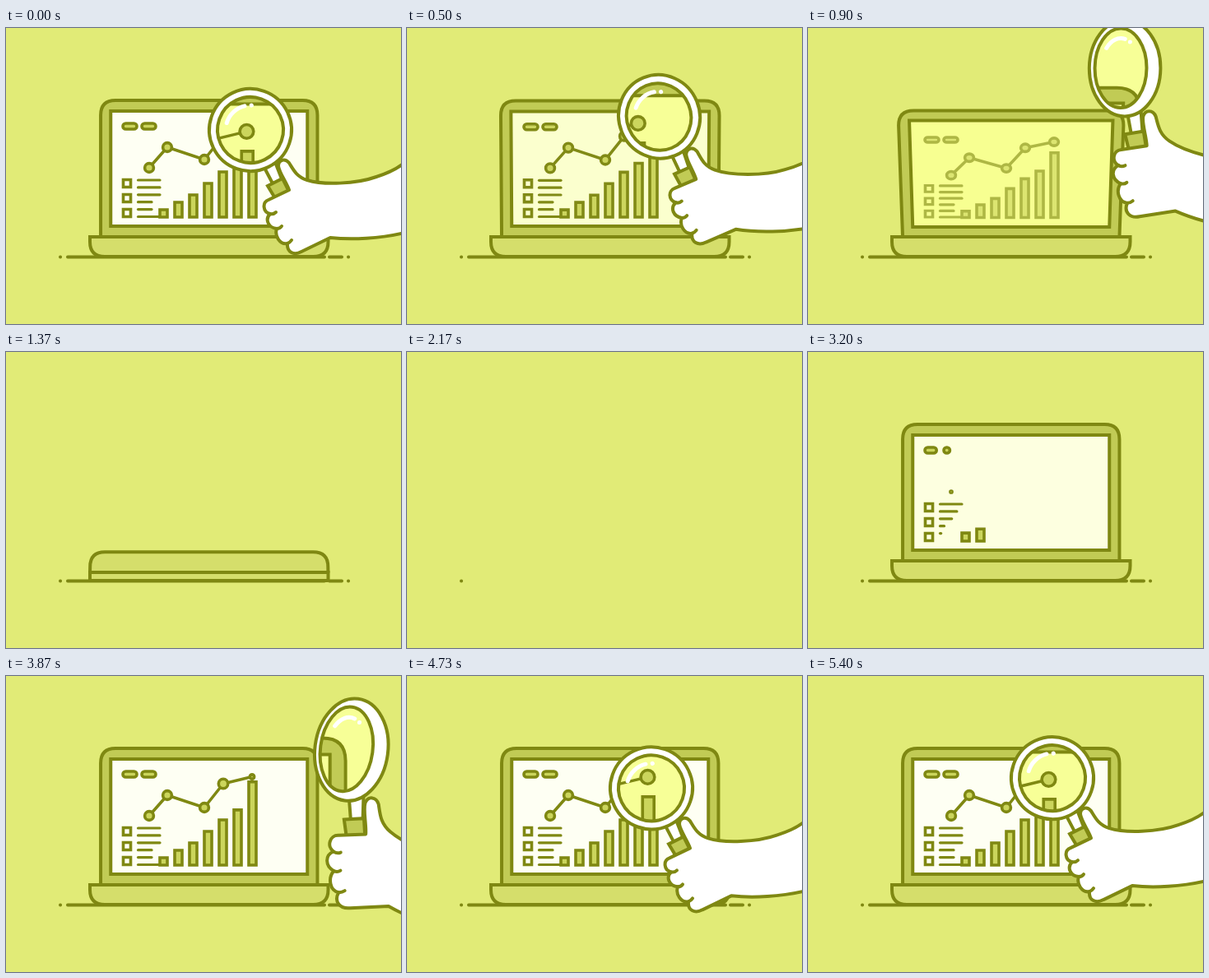
An HTML page for the animation above (5.43 s loop, 480 by 360 pixels).

```html
<!DOCTYPE html>
<html lang="en">
<head>
<meta charset="utf-8">
<title>Chart under a magnifying glass</title>
<style>
  html, body { margin: 0; width: 100%; height: 100%; overflow: hidden; background: #e1eb77; }
  svg { display: block; width: 100vw; height: 100vh; }
  .ink { stroke: #7f8812; stroke-width: 4; stroke-linejoin: round; stroke-linecap: round; }
  .ink * { vector-effect: non-scaling-stroke; }
  .ink .plain { vector-effect: none; }
  #screen { fill: var(--screen); stroke-linejoin: miter; }
  #base { fill: #d5de6b; stroke-linejoin: miter; }
  #chart { stroke-width: 3.6; }
  .solid { fill: #cbd55c; }
  .white { fill: #fff; }
</style>
</head>
<body>
<svg viewBox="0 0 480 360" fill="none">
  <defs>
    <clipPath id="groundClip"><rect id="groundWindow" y="270" height="16"/></clipPath>
    <clipPath id="lensClip"><ellipse id="lensShape"/></clipPath>
  </defs>
  <path class="ink" clip-path="url(#groundClip)" d="M66 278.5h.1M75 278.5H387M393 278.5H408M416 278.5h.1"/>
  <g id="stageLaptop">
    <g id="laptop" class="ink">
      <path id="lid"/>
      <path id="screen"/>
      <g id="chart"></g>
      <path id="base"/>
    </g>
  </g>
  <g id="tool" class="ink">
    <path class="white" d="M313 168L325 191L336 186L327 163"/>
    <ellipse id="rim" class="white"/>
  </g>
  <g clip-path="url(#lensClip)">
    <rect width="480" height="360" fill="#f7ff97"/>
    <use id="magnified" href="#laptop" style="--screen:#f7ff97"/>
  </g>
  <g id="front" class="ink">
    <g id="glass">
      <ellipse id="lensEdge"/>
      <path id="shine" stroke="#fff" stroke-width="5"/>
    </g>
    <path fill="#c1cb55" stroke-linejoin="miter" d="M318 192L336 183L344 199L327 207Z"/>
    <path class="white" d="M344 197C341 188 332 176 331 168C331 160 339 158 344 164
      C349 172 353 181 366 185C385 191 425 190 450 181C466 176 478 169 484 164L800 30V290
      L484 249C455 256 420 258 394 255L359 272C350 277 341 273 342 262
      C333 264 326 253 329 244C319 243 314 233 321 226C312 224 311 212 319 209Z"/>
    <path d="M321 226q4 1 7-2M329 244q4 0 6-3M342 262q3-1 5-4"/>
  </g>
</svg>
<script>
const LOOP = 5430, CX = 246.75, GROUND = 278;
const $ = id => document.getElementById(id);
const clamp = v => Math.max(0, Math.min(1, v));
const span = (t, from, to) => clamp((t - from) / (to - from));
const mix = (a, b, p) => a + (b - a) * p;
const mixColor = (a, b, p) => `rgb(${a.map((v, i) => mix(v, b[i], p)).join()})`;
const pop = u => u <= 0 ? 0 : 1 + 2.7 * (u - 1) ** 3 + 1.7 * (u - 1) ** 2;

function set(el, attrs) {
  for (const name in attrs) el.setAttribute(name, attrs[name]);
  return el;
}
function add(parent, tag, attrs) {
  return parent.appendChild(set(document.createElementNS('http://www.w3.org/2000/svg', tag), attrs));
}

// Smooth monotone interpolation through [time, value...] keys.
function track(keys) {
  const slope = (i, c) => (keys[i + 1][c] - keys[i][c]) / (keys[i + 1][0] - keys[i][0]);
  const tangent = (i, c) => {
    if (i === 0 || i === keys.length - 1) return 0;
    const a = slope(i - 1, c), b = slope(i, c);
    return a * b <= 0 ? 0 : 2 * a * b / (a + b);
  };
  return t => {
    let i = 0;
    while (i < keys.length - 2 && t >= keys[i + 1][0]) i++;
    const d = keys[i + 1][0] - keys[i][0], u = span(t, keys[i][0], keys[i + 1][0]), v = 1 - u;
    return keys[0].slice(1).map((_, n) => {
      const c = n + 1;
      return keys[i][c] * (1 + 2 * u) * v * v + keys[i + 1][c] * u * u * (3 - 2 * u)
        + d * (tangent(i, c) * u * v * v - tangent(i + 1, c) * u * u * v);
    });
  };
}

// lid openness, base height, lift above the ground
const laptopAt = track([
  [0, 1, 24, 0], [400, 1, 24, 0], [900, .925, 24, 0], [1160, .4, 22, 0],
  [1370, .15, 10, 0], [1640, 0, 0, 0], [2290, 0, 0, 0], [2480, .35, 20, 8],
  [2700, .91, 24, 29.5], [2890, 1.01, 24, 40], [3090, 1, 24, 0], [LOOP, 1, 24, 0]
]);
// grip x, grip y, rotation, scale, sideways turn of the glass
const poseAt = track([
  [0, 331, 195, 0, 1, 0], [570, 340, 178, 3, 1.02, .15], [900, 398, 137, 17, 1.13, .9],
  [1130, 600, 70, 40, 1.2, 1], [3540, 620, 214, 40, 1.2, 1], [3660, 530, 207, 32, 1.2, 1],
  [3770, 455, 172, 25, 1.2, 1], [3870, 424, 184, 23.2, 1.2, 1], [4000, 400, 187, 19, 1.16, .85],
  [4250, 358, 192, 8, 1.06, .35], [4500, 333, 202, 1, 1, 0], [4680, 331, 207.5, 0, 1, 0],
  [5080, 331, 202, 0, 1, 0], [LOOP, 331, 195, 0, 1, 0]
]);
const lensAt = track([
  [0, -171, -64], [900, -191, -83], [3870, -174, -61], [4730, -171, -67], [LOOP, -171, -64]
]);
const chartOpacity = track([[0, 1], [400, 1], [900, .6], [1120, 0], [2400, 0], [2500, 1], [LOOP, 1]]);
const whiteness = track([[0, 1], [250, 1], [850, 0], [2950, 0], [3300, 1], [LOOP, 1]]);

const chart = $('chart');
const pills = [142, 165].map(x =>
  add(chart, 'rect', { x, y: 116, height: 7, rx: 3.5, class: 'solid' }));
const boxes = [189, 207, 225].map(y => add(chart, 'path', {
  class: 'plain', pathLength: 100, 'stroke-linejoin': 'miter', 'stroke-linecap': 'butt',
  d: `M151.5 ${y - 3}v7.5h-9v-9h9v1.5`
}));
const rows = [188, 188, 188, 178, 178, 188].map((end, i) => ({
  end, el: add(chart, 'path', { 'stroke-width': 3.2 }), y: 185 + i * 8.9
}));
const bars = [221, 212, 203, 189, 175, 164, 138].map((top, i) => ({
  top, el: add(chart, 'rect', { x: 187 + i * 18, width: 9, class: 'solid', 'stroke-linejoin': 'miter' })
}));
const curve = add(chart, 'polyline', {});
const points = [[174, 170], [196, 145], [241, 160], [264, 131], [299, 122.5]];
const dots = points.map(([cx, cy]) => add(chart, 'circle', { cx, cy, class: 'solid' }));

function drawLaptop(t) {
  const [open, baseH, lift] = laptopAt(t);
  const hinge = GROUND - baseH, h = 166 * open;
  const lean = 13 * Math.sqrt(Math.max(0, 1 - open * open));
  const folded = clamp((.5 - open) / .3);
  const top = 131.7 + lean, bottom = 131.7 + 13 * folded, r = Math.min(18, h * .75);
  const x = dx => CX + dx, y = hinge - h;
  set($('laptop'), { transform: `translate(0 ${-lift})`, visibility: baseH > .3 ? 'visible' : 'hidden' });
  set($('lid'), {
    d: `M${x(-bottom)} ${hinge}L${x(-top)} ${y + r}Q${x(-top)} ${y} ${x(r - top)} ${y}
      H${x(top - r)}Q${x(top)} ${y} ${x(top)} ${y + r}L${x(bottom)} ${hinge}Z`,
    fill: mixColor([193, 203, 85], [213, 222, 107], folded)
  });
  const st = 119.5 + lean * .85, sy = hinge - 153 * open, sb = hinge - 13 * open;
  set($('screen'), {
    d: `M${x(-119.5)} ${sb}L${x(-st)} ${sy}H${x(st)}L${x(119.5)} ${sb}Z`,
    opacity: 1 - clamp((.4 - open) / .15)
  });
  const br = Math.max(0, 18 - (24 - baseH) * 1.2);
  set($('base'), {
    d: `M102 ${hinge}H391.5V${GROUND - br}q0 ${br} ${-br} ${br}H${102 + br}q${-br} 0 ${-br} ${-br}Z`
  });
  $('stageLaptop').style.setProperty('--screen',
    mixColor([247, 255, 145], [254, 255, 243], whiteness(t)[0]));
  set(chart, {
    transform: `translate(0 ${hinge - 254 + 233}) scale(1 ${open * open}) translate(0 -233)`,
    opacity: chartOpacity(t)[0]
  });
}

function drawChart(t) {
  const now = t < 2000 ? LOOP : t;
  const show = (el, on) => set(el, { visibility: on ? 'inherit' : 'hidden' });
  pills.forEach((el, i) => {
    const p = span(now, 2950 + i * 120, 3250 + i * 120);
    show(set(el, { width: 17 * p }), p > 0);
  });
  boxes.forEach(el => {
    const p = span(now, 2650, 3050);
    show(set(el, { 'stroke-dasharray': `${p * 101} 200` }), p > 0);
  });
  rows.forEach(({ el, end, y }, i) => {
    const p = span(now, 2900 + i * 70, 3200 + i * 70);
    show(set(el, { d: `M160.5 ${y}H${mix(160.5, end - 1, p)}` }), p > 0);
  });
  bars.forEach(({ el, top }, i) => {
    const start = 3000 + i * 110, size = (230 - top) * pop(span(now, start, start + 360));
    show(set(el, { y: 230 - size, height: Math.max(0, size) }), size > 0);
  });
  const p = span(now, 3200, 3850) * 4, i = Math.min(3, Math.floor(p));
  const tip = [0, 1].map(c => mix(points[i][c], points[i + 1][c], p - i));
  show(set(curve, { points: [...points.slice(0, i + 1), tip].join(' ') }), p > 0);
  dots.forEach((el, n) => {
    const start = 3190 + n * 162.5, r = 5.4 * pop(span(now, start, start + 250));
    show(set(el, { r: Math.max(0, r) }), r > 0);
  });
}

function drawTool(t) {
  const [x, y, angle, scale, turn] = poseAt(t);
  const [lx, ly] = lensAt(t);
  const pose = `translate(${x} ${y}) rotate(${angle}) scale(${scale}) translate(-331 -195)`;
  const tilt = `translate(297 124) rotate(${-25.6 + 10 * turn})`;
  const lens = { cx: -5 * turn, rx: 40 - 13.5 * turn, ry: 40 + 3 * turn };
  const at = deg => {
    const a = deg * Math.PI / 180;
    return `${lens.cx + .75 * lens.rx * Math.sin(a)} ${-.75 * lens.ry * Math.cos(a)}`;
  };
  set($('tool'), { transform: pose });
  set($('front'), { transform: pose });
  set($('rim'), { transform: tilt, rx: 50 - 13 * turn, ry: 50 + 2 * turn });
  set($('glass'), { transform: tilt });
  set($('lensEdge'), lens);
  set($('lensShape'), { ...lens, transform: `${pose} ${tilt}` });
  set($('shine'), {
    d: `M${at(-48)}A${.75 * lens.rx} ${.75 * lens.ry} 0 0 1 ${at(12)}M${at(28)}h.1`
  });
  set($('magnified'), { transform: `translate(${lx} ${ly}) scale(1.55)` });
}

function drawGround(t) {
  const left = t < 2100 ? mix(60, 422, span(t, 1450, 2080)) : 60;
  const right = t < 2100 ? 422 : mix(60, 422, span(t, 2140, 3140));
  set($('groundWindow'), { x: left, width: Math.max(0, right - left) });
}

function render(t) {
  drawLaptop(t);
  drawChart(t);
  drawTool(t);
  drawGround(t);
}

const begin = performance.now();
function tick() {
  render((performance.now() - begin) % LOOP);
  requestAnimationFrame(tick);
}
tick();
</script>
</body>
</html>
```
